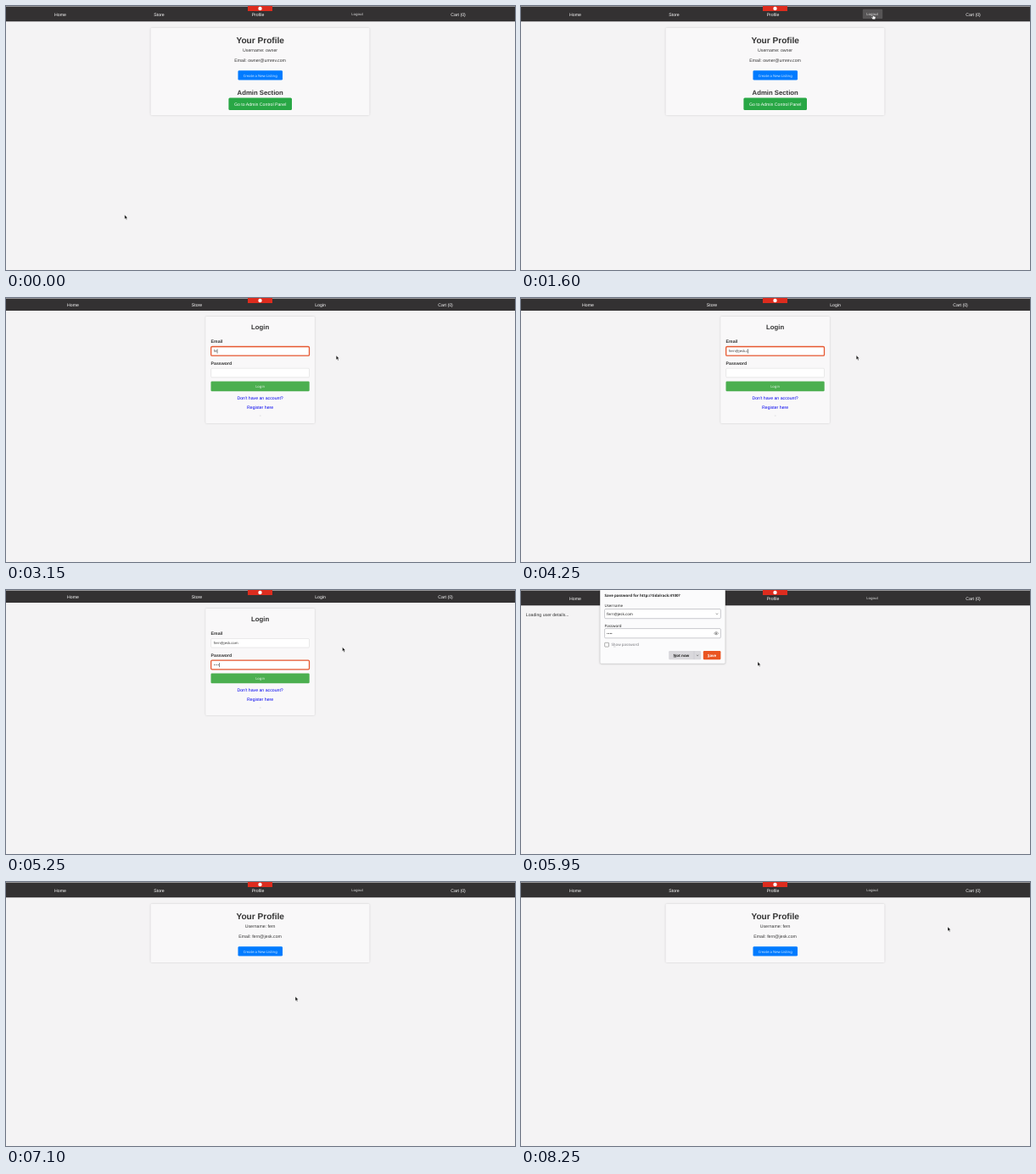
An HTML page for the animation above (8.35 s loop, 600 px wide and 312 px high).

```html
<!DOCTYPE html>
<html lang="en">
<head>
<meta charset="utf-8">
<title>Login flow</title>
<style>
  html, body { margin: 0; width: 100%; height: 100%; overflow: hidden; background: #f4f3f4; }
  svg { display: block; width: 100vw; height: 100vh; }
  text { font: 5.2px "Liberation Sans", Arial, sans-serif; fill: #333; text-rendering: geometricPrecision; white-space: pre; }
  .ui { font: 4.17px "Noto Sans", sans-serif; }
  .dlg { font: 4.45px "Noto Sans", sans-serif; fill: #222; }
  .bold { font-weight: bold; }
  .h1 { font-size: 10.1px; font-weight: bold; }
  .h2 { font-size: 7.75px; font-weight: bold; }
  .mid { text-anchor: middle; }
  .white { fill: #fff; }
  .soft { fill: #fff; fill-opacity: .85; }
  .link { fill: #0000ee; }
  .card { fill: #f9f8f9; filter: drop-shadow(0 0 .8px rgba(0, 0, 0, .16)); }
  .popup { fill: #fbfbfc; stroke: #c9c9cd; stroke-width: .4; filter: drop-shadow(0 .4px 1px rgba(0, 0, 0, .25)); }
</style>
</head>
<body>
<svg id="stage" viewBox="0 0 600 312" preserveAspectRatio="none"></svg>
<script>
const LOOP = 8350, STEP = 50;
const NS = "http://www.w3.org/2000/svg";
const EMAIL = "fern@jesk.com";
const HOST = "tidalrack";
const stage = document.getElementById("stage");

function add(parent, tag, attrs = {}, text) {
  const el = document.createElementNS(NS, tag);
  for (const key in attrs) el.setAttribute(key, attrs[key]);
  if (text !== undefined) el.textContent = text;
  parent.appendChild(el);
  return el;
}
const group = parent => add(parent, "g");
const label = (parent, x, y, text, cls = "") => add(parent, "text", { x, y, class: cls }, text);
const box = (parent, x, y, width, height, fill, attrs = {}) =>
  add(parent, "rect", { x, y, width, height, fill, ...attrs });
const stroke = (parent, d, color, width = .5) =>
  add(parent, "path", { d, fill: "none", stroke: color, "stroke-width": width });
const show = (el, on) => { el.style.display = on ? "" : "none"; };

function navBar(parent, height, baseline, items) {
  box(parent, 0, .6, 600, height - .6, "#333132");
  for (const [text, x] of items) label(parent, x, baseline, text, "mid white");
  box(parent, 285, 0, 29, 6, "#dd2c1e");
  add(parent, "circle", { cx: 299.5, cy: 3, r: 2.2, fill: "#fff" });
}

box(stage, 0, 0, 600, 312, "#f4f3f4");
box(stage, 0, 0, 600, .6, "#cfcfd3");

// Signed-in page: navigation, profile card, loading note
const member = group(stage);
navBar(member, 18.3, 11.5, [["Home", 64], ["Store", 180.5], ["Profile", 297], ["Cart (0)", 533]]);
const hover = box(member, 402.8, 3.8, 23.4, 11.3, "#575556", { rx: 1.2 });
label(member, 414.2, 11.2, "Logout", "ui mid soft");

const profile = group(member);
const card = box(profile, 170.6, 26, 257.8, 103, "", { class: "card", rx: 1.2 });
label(profile, 299.7, 43.7, "Your Profile", "h1 mid");
const userLine = label(profile, 299.6, 54.4, "", "mid");
const mailLine = label(profile, 299.6, 65.8, "", "mid");
box(profile, 273.5, 76.2, 52.5, 11.4, "#007bff", { rx: 1.4 });
label(profile, 299.7, 83.5, "Create a New Listing", "ui mid soft");

const admin = group(profile);
label(admin, 299.7, 104.7, "Admin Section", "h2 mid");
box(admin, 262.4, 108.5, 74.6, 14.6, "#28a745", { rx: 1.5 });
label(admin, 299.6, 117.6, "Go to Admin Control Panel", "mid white");

const loading = label(member, 5.8, 30.6, "Loading user details...");

// Login page
const login = group(stage);
navBar(login, 15, 9.5, [["Home", 79], ["Store", 225], ["Login", 370.5], ["Cart (0)", 518]]);
box(login, 235.3, 22, 128.6, 126, "", { class: "card", rx: 1.2 });
label(login, 299.6, 37.2, "Login", "h2 mid");

function field(name, y) {
  label(login, 241.6, y - 4.4, name, "bold");
  const frame = box(login, 241.7, y, 115.8, 10.6, "#fff", { rx: 1.2 });
  const text = label(login, 244.8, y + 6.9, "", "ui");
  const caret = box(login, 0, y + 2.8, .5, 5.2, "#111");
  return (value, focus) => {
    frame.setAttribute("stroke", focus ? "#e6572f" : "#cccccc");
    frame.setAttribute("stroke-width", focus ? 1.3 : .4);
    text.textContent = value;
    show(caret, focus);
    if (focus) caret.setAttribute("x", 245 + (value ? text.getComputedTextLength() : 0));
  };
}
const setEmail = field("Email", 57.5);
const setPass = field("Password", 83.2);
box(login, 241.5, 98.6, 116.2, 11.6, "#4caf50", { rx: 1.2 });
label(login, 299.6, 105.9, "Login", "ui mid soft");
label(login, 299.6, 119.7, "Don't have an account?", "mid link");
label(login, 299.6, 131.1, "Register here", "mid link");
box(login, 298.8, 138.8, 1.8, .5, "#c4c4c8");

// Save-password popup
const popup = group(stage);
box(popup, 93.2, -4, 147.6, 91, "", { class: "popup", rx: 1.4 });
label(popup, 98.5, 7.9, `Save password for http://${HOST}:4100?`, "dlg bold");
for (const [name, value, y] of [["Username", EMAIL, 22.5], ["Password", "••••", 45.6]]) {
  label(popup, 98.5, y - 2.1, name, "dlg");
  box(popup, 98.6, y, 136.8, 11.2, "#fff", { rx: 1.2, stroke: "#96969e", "stroke-width": .5 });
  label(popup, 101.1, y + 7.3, value, "dlg");
}
stroke(popup, "M229.7 27.6l1.3 1.2 1.3-1.2", "#444");
stroke(popup, "M227.6 51.2q2.5-3.2 5 0q-2.5 3.2-5 0z", "#444");
add(popup, "circle", { cx: 230.1, cy: 51.2, r: .8, fill: "#444" });
box(popup, 98.7, 62.3, 4.8, 4.8, "#fff", { rx: .6, stroke: "#777", "stroke-width": .6 });
label(popup, 106.4, 66.4, "Show password", "dlg").style.fill = "#77777d";
stroke(popup, "M109 67h2.5", "#77777d", .3);
box(popup, 174.2, 72, 38, 10.2, "#d9d8dc", { rx: 1.2 });
stroke(popup, "M204 72.2v9.8", "#bcbbc0", .4);
stroke(popup, "M206.9 76.7l1.2 1.1 1.2-1.1", "#333");
label(popup, 189, 78.7, "Not now", "dlg bold mid");
stroke(popup, "M179.8 79.5h3.3", "#222", .35);
box(popup, 214.8, 72, 20.6, 10.2, "#ea5421", { rx: 1.2 });
label(popup, 225.1, 78.7, "Save", "dlg bold mid white");
stroke(popup, "M219.8 79.5h2.4", "#fff", .35);

const status = group(stage);
box(status, -1, 305, 104.6, 8, "#f8f8fa", { stroke: "#c6c6ca", "stroke-width": .5 });
label(status, .8, 310.2, HOST, "ui");

// Pointer shapes, each with its hot spot at 0,0
const pointer = group(stage);
const shape = (d, fill, line) =>
  add(pointer, "path", { d, fill, stroke: line, "stroke-width": .4, "stroke-linejoin": "round" });
const arrow = shape("M0 0v5l1.2-1 .8 1.8 .9-.4-.8-1.8h1.5z", "#111", "#fff");
const hand = shape("M-.5 0q.5-.5 1 0v2l2.1.6q.5.2.4.8l-.5 2.4h-3L-2 3.5q.2-.8 1.5 0z", "#fff", "#222");
const beam = shape("M-1-2.5h2M0-2.5v5M-1 2.5h2", "none", "#222");

// time, x, y
const path = [
  [0, 139.8, 246.8], [400, 139.8, 246.8], [1200, 412.5, 17.5], [1400, 415, 10],
  [1750, 415, 10], [2050, 332, 125], [2400, 318, 63], [2550, 318, 63],
  [2900, 387.5, 68], [3150, 389.2, 68], [3700, 394.3, 68], [4550, 395.6, 67.8],
  [4950, 396.5, 67.6], [5300, 396.5, 67.6], [5950, 279, 84.8], [6200, 190, 77],
  [6350, 190, 77], [6700, 305.3, 139], [7100, 341, 135.4], [7250, 340.4, 135.2],
  [7650, 340.4, 135.2], [8100, 509.5, 53], [8250, 503, 53], [LOOP, 503, 53]
];
const ease = k => k * k * (3 - 2 * k);

function pointerAt(t) {
  const i = Math.max(1, path.findIndex(p => p[0] > t));
  const [t0, x0, y0] = path[i - 1], [t1, x1, y1] = path[i];
  const k = ease((t - t0) / (t1 - t0));
  return [x0 + (x1 - x0) * k, y0 + (y1 - y0) * k];
}

const emailKeys = [3000, 3100, 3250, 3350, 3500, 3600, 3700, 3850, 3950, 4150, 4250, 4400, 4550];
const passKeys = [4800, 4900, 4950, 5100];
const typed = (keys, t) => keys.filter(k => k <= t).length;
const between = (t, a, b) => t >= a && t < b;

function render(now) {
  const t = Math.floor((now % LOOP) / STEP) * STEP;
  const onLogin = between(t, 1750, 5600);
  const blank = between(t, 6450, 6750);
  const waiting = between(t, 5600, 6450);
  const owner = t < 1750;

  show(login, onLogin);
  show(member, !onLogin && !blank);
  show(profile, !waiting);
  show(loading, waiting);
  show(popup, between(t, 5650, 6300));
  show(status, between(t, 6500, 6750));

  show(admin, owner);
  card.setAttribute("height", owner ? 103 : 69);
  userLine.textContent = "Username: " + (owner ? "owner" : "fern");
  mailLine.textContent = "Email: " + (owner ? "owner@umrev.com" : EMAIL);

  if (onLogin) {
    setEmail(EMAIL.slice(0, typed(emailKeys, t)), between(t, 2450, 4700));
    setPass("•".repeat(typed(passKeys, t)), t >= 4700);
  }

  const [x, y] = pointerAt(t);
  const overLogout = owner && x > 403 && x < 426 && y < 15;
  const overField = onLogin && x > 241 && x < 358 && y > 57 && y < 94;
  show(hover, overLogout);
  show(hand, overLogout);
  show(beam, overField);
  show(arrow, !overLogout && !overField);
  pointer.setAttribute("transform", `translate(${x} ${y})`);
}

function tick() {
  render(performance.now());
  requestAnimationFrame(tick);
}
tick();
</script>
</body>
</html>
```
